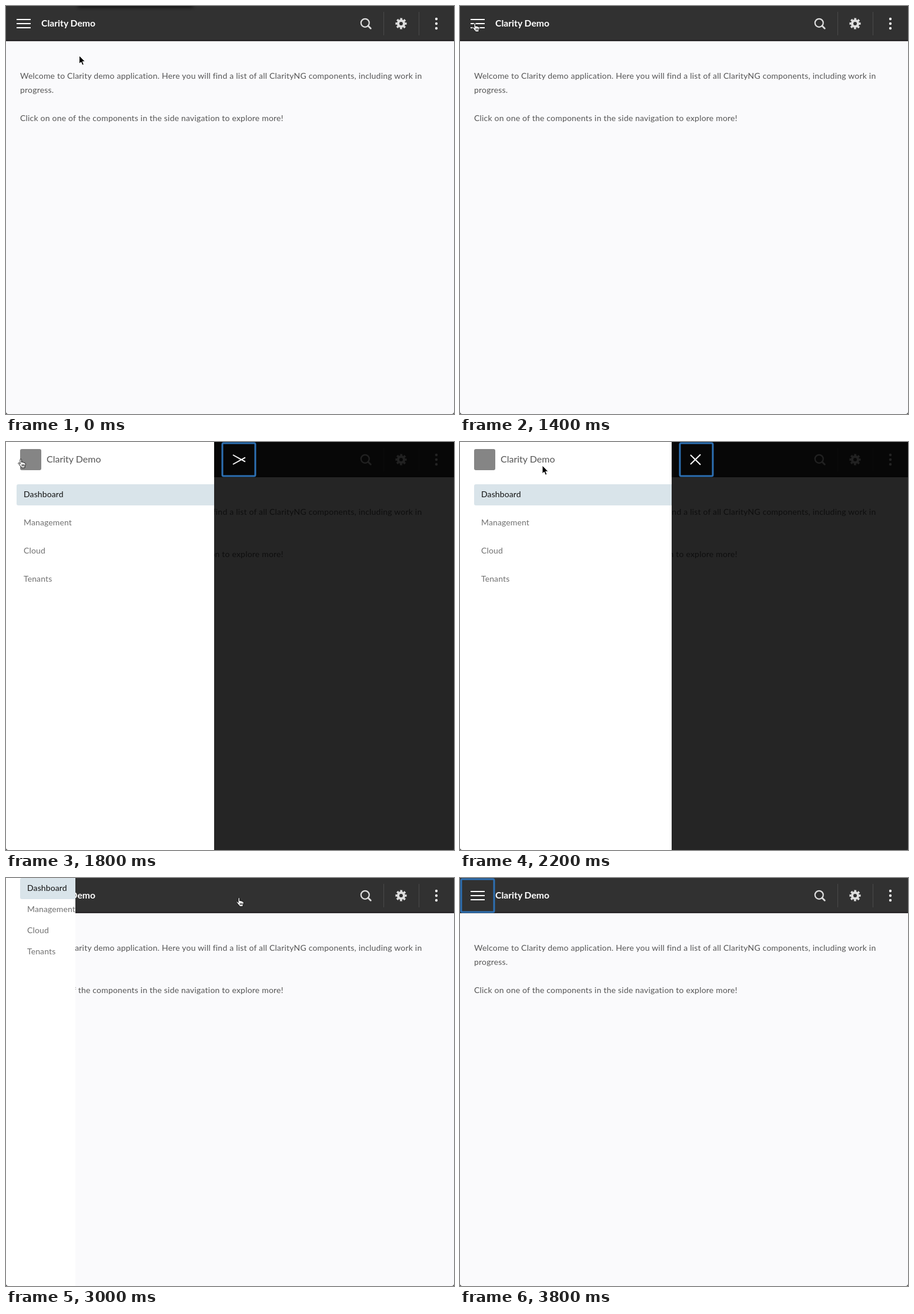
An HTML page for the animation above (4 s loop, 762 by 695 pixels).

```html
<!DOCTYPE html>
<html lang="en">
<head>
<meta charset="utf-8">
<title>Side navigation</title>
<style>
  html, body { margin: 0; width: 100%; height: 100%; overflow: hidden; background: #fafafc; }
  svg { display: block; width: 762px; height: 695px; }
  text { font: 14px Lato, "Open Sans", sans-serif; fill: #565656; letter-spacing: .2px; }
  .title { font-size: 16px; letter-spacing: 0; }
  .brand { font-size: 15.7px; font-weight: 700; fill: #fff; }
  .nav text { fill: #717171; letter-spacing: .12px; }
  .nav .active { fill: #111; }
  .bars { stroke: #fff; stroke-width: 2; }
  .shadow { filter: blur(3px); }
</style>
</head>
<body>
<svg viewBox="0 0 762 695">
  <defs>
    <clipPath id="panelClip"><rect id="clipBox" height="695"/></clipPath>
  </defs>

  <rect width="762" height="695" fill="#fafafc"/>
  <rect width="762" height="60" fill="#313131"/>
  <rect y="57" width="762" height="3" fill="#2b292b"/>
  <rect id="shadow" class="shadow" x="122" y="-6" width="196" height="8" fill="#000" opacity=".7"/>

  <g id="burger" class="bars"><path d="M18 23H42M18 30H42M18 37H42"/></g>
  <text id="brand" class="title brand" x="60" y="35">Clarity Demo</text>

  <path d="M642.5 10V50M702.5 10V50" stroke="#4a4a4a"/>
  <g fill="none" stroke="#dedede">
    <circle cx="610.8" cy="28.8" r="7" stroke-width="2.2"/>
    <path d="M615.8 33.8L620.3 38.3" stroke-width="2.8" stroke-linecap="round"/>
    <circle cx="672" cy="30" r="5.1" stroke-width="4.2"/>
    <circle cx="672" cy="30" r="8" stroke-width="3.2" stroke-dasharray="3.5 2.783" transform="rotate(-12.5 672 30)"/>
  </g>
  <g fill="#f0f0f0">
    <circle cx="732" cy="22" r="2.2"/><circle cx="732" cy="30" r="2.2"/><circle cx="732" cy="38" r="2.2"/>
  </g>

  <text x="24" y="124">Welcome to Clarity demo application. Here you will find a list of all ClarityNG components, including work in</text>
  <text x="24" y="148">progress.</text>
  <text x="24" y="196">Click on one of the components in the side navigation to explore more!</text>

  <rect id="overlay" width="762" height="695" opacity=".85"/>

  <rect id="panel" height="695" fill="#fff"/>
  <g clip-path="url(#panelClip)"><g id="nav" class="nav"></g></g>
  <g id="drawerHead">
    <rect x="24" y="12" width="36" height="36" rx="3" fill="#858585"/>
    <text class="title" x="69" y="35">Clarity Demo</text>
  </g>

  <g id="focus">
    <rect x="2" y="2" width="56" height="56" rx="2" fill="none" stroke="#2d70b3" stroke-width="3"/>
    <g id="cross" class="bars"><path id="strokeA" d="M20 22H44"/><path id="strokeB" d="M20 38H44"/></g>
  </g>

  <path d="M0 691Q0 695 4 695H0ZM762 691Q762 695 758 695H762Z" fill="#333"/>

  <path id="arrow" d="M0 0V14L3.2 11L5.4 16.2L7.9 15.1L5.7 10.2H10Z" stroke="#fff"/>
  <g id="hand" stroke="#000" stroke-width=".9">
    <path fill="#fff" d="M4 9V1.8Q4 .6 5.2 .6T6.4 1.8V6Q7 5.2 8 5.5Q8.8 5.8 8.8 6.4Q9.5 5.9 10.3 6.3Q11 6.6 11 7.3Q12 6.9 12.6 7.4Q13.2 7.8 13.2 9Q13.2 11 12 13V15.4H6.2L6 14.2Q4 12.3 2.9 10.5Q1.6 8.8 .9 8.1Q.5 7.2 1.4 6.9Q2.6 6.7 4 8.6Z"/>
    <path d="M7.2 9.5V13M9 9.5V13M10.8 9.5V13"/>
  </g>
</svg>

<script>
const LOOP = 4000, STEP = 200, FULL = 360;
const $ = id => document.getElementById(id);
const show = (id, on) => $(id).style.display = on ? '' : 'none';
const set = (id, attrs) => { for (const k in attrs) $(id).setAttribute(k, attrs[k]); };
const move = (id, x, y) => set(id, { transform: `translate(${x} ${y})` });

// Pointer at each step: x, y, and 1 for the hand
const pointer = [
  [124.5, 84.5], [168, 80], [89, 29], [27, 29], [60, 66], [4, 24], [78, 28],
  [20, 28.5, 1], [20, 28.5, 1], [20, 28.5, 1], [20, 28.5, 1],
  [140, 40], [330, 40], [391, 33, 1], [391, 33, 1], [391, 33, 1],
  [391, 37], [306, 29], [75, 127], null
];

// Drawer by step: width, focus ring x, icon angle
const opening = { 8: [82, 85, 4], 9: [354, 366, 29] };
const opened = [FULL, 372, 44.5];
const items = ['Dashboard', 'Management', 'Cloud', 'Tenants'];

function drawNav(x, y, pitch) {
  $('nav').innerHTML =
    `<rect x="${x}" y="${y}" width="400" height="36" rx="3" fill="#d9e4ea"/>` +
    items.map((label, i) =>
      `<text x="${x + 12}" y="${y + 22 + i * pitch}"${i ? '' : ' class="active"'}>${label}</text>`).join('');
}

function render(step) {
  const open = step >= 8 && step < 15;
  const closing = step === 15;
  const closed = step > 15;
  const [width, ringX, angle] = open ? opening[step] || opened : [closing ? 118 : 0, 0, 0];

  show('shadow', step === 0);
  show('overlay', open);
  show('brand', !open);
  show('burger', !open);
  show('drawerHead', open);
  show('focus', open || closed);
  show('cross', open);

  set('panel', { width });
  set('clipBox', { width });
  if (closing) drawNav(24, 0, 36);
  else drawNav(width - FULL + 24, 72, 48);

  move('focus', ringX, 0);
  set('strokeA', { transform: `rotate(${angle} 20 22)` });
  set('strokeB', { transform: `rotate(${-angle} 20 38)` });

  const [x, y, isHand] = pointer[step] || [];
  show('arrow', pointer[step] && !isHand);
  show('hand', isHand);
  if (pointer[step]) move(isHand ? 'hand' : 'arrow', x, y);
}

let last = -1;
function tick(now) {
  const step = Math.floor(now % LOOP / STEP);
  if (step !== last) render(last = step);
  requestAnimationFrame(tick);
}
render(0);
requestAnimationFrame(tick);
</script>
</body>
</html>
```
